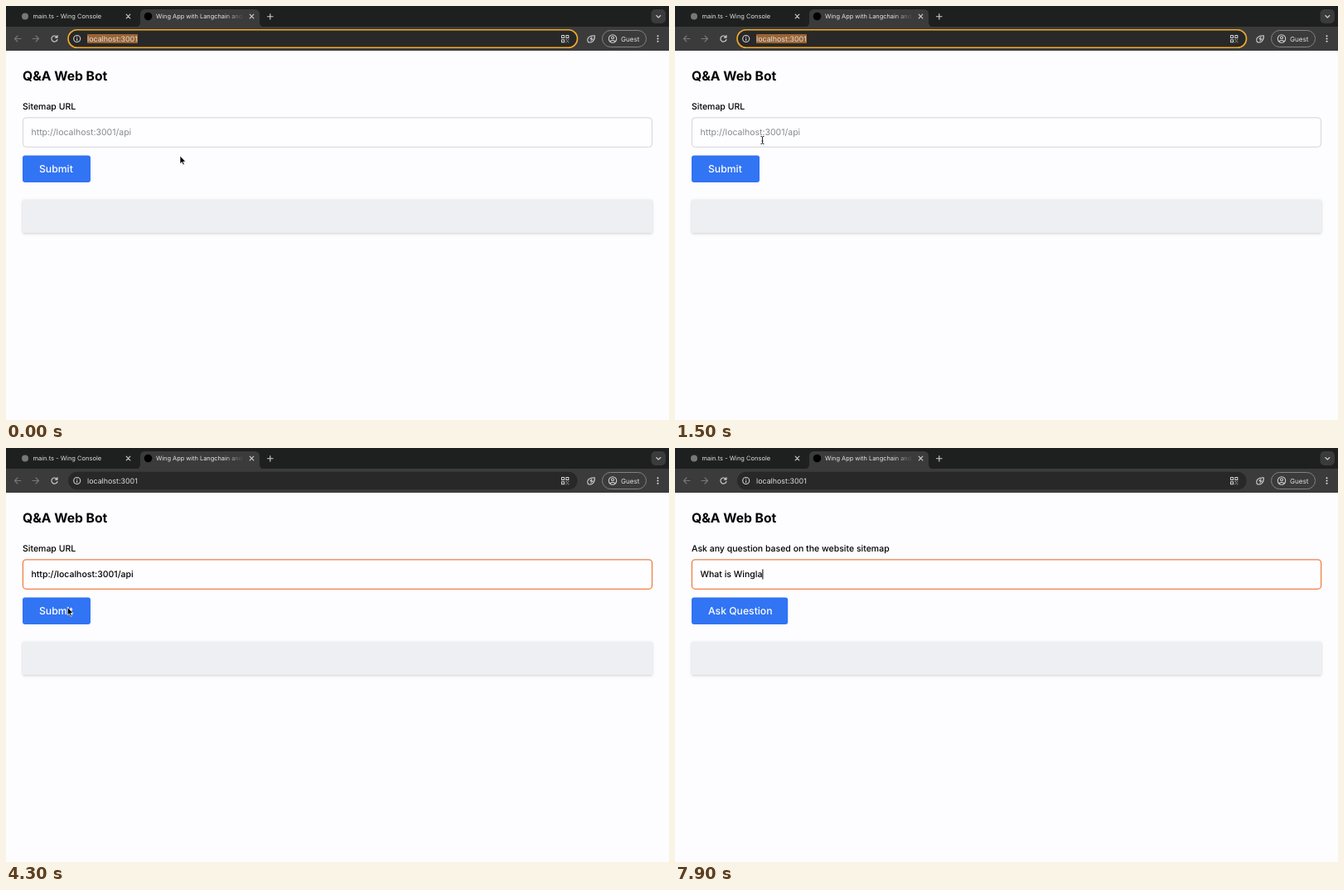
Animation of 800x500 px, one loop 8000 ms. Source, as an HTML page:

```html
<!DOCTYPE html>
<html lang="en">
<head>
<meta charset="utf-8">
<title>Q&amp;A Web Bot</title>
<style>
  html, body { margin: 0; width: 100%; height: 100%; overflow: hidden; background: #fdfcfe; }
  svg { display: block; width: 800px; height: 500px; font-family: Inter, "Open Sans", sans-serif; text-rendering: geometricPrecision; }
  text { white-space: pre; }
  .line { fill: none; stroke: #d0d0d0; stroke-width: 1.1; stroke-linecap: round; stroke-linejoin: round; }
  .ui { fill: #dedede; }
  .dim { stroke: #787878; }
  .body { font-size: 10.5px; font-weight: 500; }
  .button { font-size: 12.2px; font-weight: 500; fill: #fff; }
</style>
</head>
<body>
<svg viewBox="0 0 800 500">
  <defs>
    <linearGradient id="fade" gradientUnits="userSpaceOnUse" x1="264" x2="287" y1="0" y2="0">
      <stop stop-color="#e4e4e4"/><stop offset="1" stop-color="#e4e4e4" stop-opacity="0"/>
    </linearGradient>
    <filter id="shadow" x="-5%" y="-30%" width="110%" height="180%">
      <feDropShadow dx="0" dy="1.5" stdDeviation="1.4" flood-opacity=".18"/>
    </filter>
  </defs>
  <rect width="800" height="500" fill="#fdfcfe"/>

  <!-- Tabs -->
  <rect width="800" height="26" fill="#1e1f1f"/>
  <path d="M156 25.5q6 0 6-6V10q0-6 6-6H300q6 0 6 6v9.500q0 6 6 6z" fill="#3b3b3b"/>
  <rect y="25" width="800" height="29" fill="#3b3b3b"/>
  <circle cx="23" cy="12.500" r="4" fill="#777"/>
  <text class="ui" x="32.500" y="15.200" font-size="7.500">main.ts - Wing Console</text>
  <circle cx="171.500" cy="12.500" r="4.800" fill="#000"/>
  <text x="181" y="15.200" font-size="7.400" fill="url(#fade)">Wing App with Langchain and</text>
  <path class="line" d="M145.200 10.200l4.600 4.600m0-4.600l-4.600 4.600M294.200 10.200l4.600 4.600m0-4.600l-4.600 4.600M315.500 12.800h6.600m-3.300-3.300v6.600"/>
  <rect x="778.500" y="4" width="17.500" height="17" rx="5" fill="#3b3b3b"/>
  <path class="line" d="M784.800 11.500l2.500 2.500 2.500-2.500"/>

  <!-- Toolbar -->
  <path class="line dim" d="M18 39.500h-7.500m3.500-3.500l-3.500 3.500 3.500 3.500M32 39.500h7.500m-3.500-3.500l3.500 3.500-3.500 3.500"/>
  <path class="line" d="M61.500 37.500a3.600 3.600 0 1 0 .5 3M62 35.500v2.600h-2.600"/>
  <rect id="bar" x="75" y="28.700" width="614.500" height="21.600" rx="10.800" fill="#282828" stroke-width="1.600"/>
  <circle class="line" cx="85.700" cy="39.500" r="4"/>
  <path class="line" d="M85.700 39.300v2.200M85.700 37.300v.1"/>
  <rect id="mark" x="98" y="34" width="61" height="11" fill="#9b6433"/>
  <text class="ui" x="98" y="42.600" font-size="8.900">localhost:3001</text>
  <path class="line" d="M670.500 35.500h3v3h-3zM675.800 35.500h3v3h-3zM670.500 40.700h3v3h-3zM675.800 40.800h.6M678.700 40.800h.1M677.300 42.300h.1M675.800 43.800h.1M678.700 43.800h.1"/>
  <path class="line" d="M702.300 43.500c-2-5 2-8 8-7.700c.5 6-3.500 9.500-8 7.700M707 37.500l-2 2.300h2.800l-2 2.200"/>
  <rect x="719.500" y="29.500" width="53" height="20" rx="10" fill="none" stroke="#838383"/>
  <circle class="line" cx="732" cy="39.500" r="4.700"/>
  <circle class="line" cx="732" cy="38.200" r="1.500"/>
  <path class="line" d="M728.800 42.700q3.200-2.500 6.400 0"/>
  <text class="ui" x="742" y="42.500" font-size="8.100">Guest</text>
  <g class="ui"><circle cx="786.500" cy="36.200" r="1"/><circle cx="786.500" cy="39.500" r="1"/><circle cx="786.500" cy="42.800" r="1"/></g>

  <!-- Page -->
  <text x="20" y="89.700" font-size="15.700" font-weight="700">Q&amp;A Web Bot</text>
  <text id="label" class="body" x="20" y="125.200"></text>
  <rect id="field" x="20.400" y="134.900" width="759.200" height="35.400" rx="4" fill="#fefdff"/>
  <text id="value" class="body" x="30.500" y="156.200"></text>
  <rect id="caret" y="146.500" width="1" height="12"/>
  <rect id="button" x="20" y="180.600" height="32.400" rx="3" fill="#3174f4"/>
  <text id="action" class="button" x="40" y="201.200"></text>
  <rect x="20" y="233.500" width="760" height="40" rx="2" fill="#eeeff2" filter="url(#shadow)"/>

  <g id="mouse">
    <path id="arrow" d="M0 0v9.600l2.200-2 1.500 3.400 1.600-.7-1.500-3.300h3z" stroke="#fff" stroke-width=".7"/>
    <path id="beam" d="M-2-4.600q2 0 2 1.200q0-1.200 2-1.200M0-3.400v6.800M-2 4.600q2 0 2-1.200q0 1.200 2 1.200M-1 1h2" fill="none" stroke="#111" stroke-width=".9"/>
  </g>
</svg>
<script>
const LOOP = 8000, STEP = 100;
const CLICK_URL = 1700, SUBMIT = 4600, CLICK_ASK = 5300;
const ui = {};
for (const el of document.querySelectorAll('[id]')) ui[el.id] = el;

const forms = [
  { label: 'Sitemap URL', hint: 'http://localhost:3001/api', action: 'Submit', width: 82, focus: CLICK_URL,
    edits: [[2500, 'http://localhost:3001/'], [3200, 'a'], [3400, 'p'], [3600, 'i']] },
  { label: 'Ask any question based on the website sitemap',
    hint: 'What is Winglang? OR Why should I use Winglang? OR How does Winglang work?',
    action: 'Ask Question', width: 116.2, focus: CLICK_ASK,
    edits: [5700, 5900, 6000, 6100, 6300, 6500, 6700, 6800, 7000, 7200, 7300, 7500, 7700, 7900]
      .map((t, i) => [t, 'What is Wingla'[i]]) }
];

// Pointer stops: time, x, y
const path = [
  [0, 210, 181], [300, 210, 181], [600, 188.5, 158], [1100, 118, 161], [1500, 105.5, 162],
  [1700, 105, 160.5], [4000, 105, 160.5], [4400, 64, 203], [4800, 64, 203], [5100, 116.3, 160], [LOOP, 116.3, 160]
];

function pointer(t) {
  const i = path.findIndex(p => p[0] > t);
  const [a, b] = [path[i - 1], path[i]];
  const k = (t - a[0]) / (b[0] - a[0]);
  return [1, 2].map(n => a[n] + (b[n] - a[n]) * k);
}

const show = (el, on) => el.setAttribute('visibility', on ? 'visible' : 'hidden');

function draw(t) {
  const form = forms[t < SUBMIT ? 0 : 1];
  const done = form.edits.filter(e => e[0] <= t);
  const text = done.map(e => e[1]).join('');
  const barFocus = t < CLICK_URL;
  const focus = t >= form.focus && !(t >= 4400 && t < SUBMIT);

  ui.bar.setAttribute('stroke', barFocus ? '#f0a92d' : 'none');
  show(ui.mark, barFocus);
  ui.label.textContent = form.label;
  ui.action.textContent = form.action;
  ui.button.setAttribute('width', form.width);
  ui.field.setAttribute('stroke', focus ? '#ed8147' : '#d2d5da');
  ui.field.setAttribute('stroke-width', focus ? 1.3 : 1);
  ui.value.textContent = text || form.hint;
  ui.value.setAttribute('fill', text ? '#000' : '#858a92');
  ui.value.style.fontWeight = text ? 500 : 400;

  const last = done.length ? done[done.length - 1][0] : form.focus;
  ui.caret.setAttribute('x', 30.5 + (text ? ui.value.getComputedTextLength() : 0));
  show(ui.caret, focus && (t - last) % 1000 < 500);

  const [x, y] = pointer(t);
  const typing = t >= 3200 && t < 4000 || t >= 5700;
  const inField = y > 134 && y < 171;
  ui.mouse.setAttribute('transform', `translate(${x} ${y})`);
  show(ui.arrow, !typing && !inField);
  show(ui.beam, !typing && inField);
}

function tick() {
  draw(Math.floor(performance.now() % LOOP / STEP) * STEP);
  requestAnimationFrame(tick);
}
tick();
</script>
</body>
</html>
```
